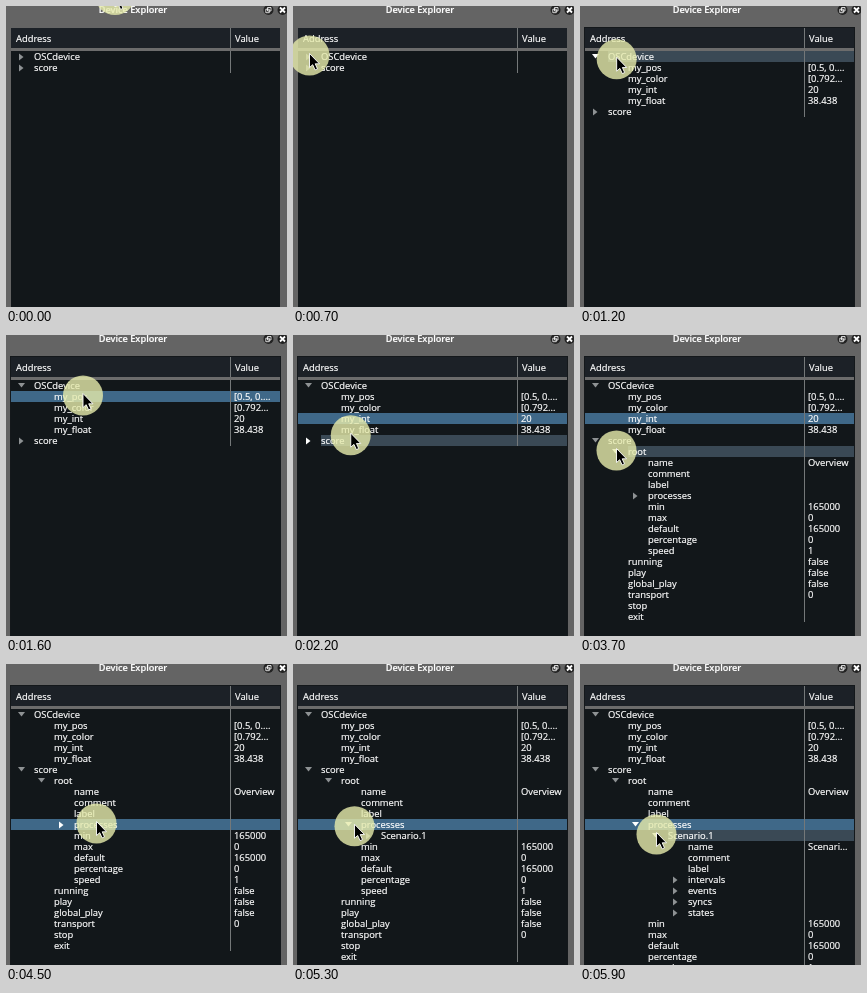
These frames come from a looping animation (281x301 px, 6700 ms). An HTML page:

```html
<!DOCTYPE html>
<html lang="en">
<head>
<meta charset="utf-8">
<title>Device Explorer</title>
<style>
  html, body { margin: 0; width: 100%; height: 100%; overflow: hidden; background: #646464; }
  body { position: relative; font: 9.4px/11px "Open Sans", "Noto Sans", sans-serif; color: #fff; -webkit-text-stroke: .2px #fff; }
  .title { position: absolute; left: 0; top: -2px; width: 254px; text-align: center; font-size: 9.2px; font-weight: 600; }
  svg { position: absolute; left: 0; top: 0; overflow: visible; }
  .panel { position: absolute; left: 5px; top: 22px; width: 269px; height: 279px; background: #12171a; overflow: hidden; }
  .panel.focused { box-shadow: 0 0 0 1px #14181b; }
  .head { position: relative; height: 20px; line-height: 21px; background: #1c2127; border-bottom: 3px solid #6c6c6c; }
  .row { position: relative; height: 11px; white-space: pre; }
  .row.hover { background: linear-gradient(#3a4955, #3a4955) var(--indent) 0 no-repeat; }
  .row.picked { background: #3f6888; }
  .head span, .row span { position: absolute; top: 0; }
  .row .label { left: var(--indent); }
  .row .value { left: 223px; }
  .head::after, .row::after { content: ""; position: absolute; left: 219px; top: 0; width: 1px; height: 100%; background: #747879; }
  .arrow { position: absolute; left: calc(var(--indent) - 16.5px); top: 2px; width: 8px; height: 8px;
           background: #8e9294; clip-path: polygon(1.5px .5px, 6px 4px, 1.5px 7.5px); }
  .arrow.open { clip-path: polygon(.5px 1px, 7.5px 1px, 4px 5.5px); }
  .hover .arrow, .picked .arrow { background: #fff; }
</style>
</head>
<body>
<div class="title">Device Explorer</div>
<svg width="281" height="12">
  <g fill="#222" stroke="#fff">
    <circle cx="262.5" cy="4" r="5" stroke="none"/>
    <path d="M261.5 1.5h3.5v3.5h-3.5zM259.8 3.2h3.5v3.5h-3.5z" stroke-width=".8"/>
    <circle cx="276.5" cy="4" r="5" stroke="none"/>
    <path d="M274 1.5l5 5m0-5l-5 5" stroke-width="1.8"/>
  </g>
</svg>
<div class="panel">
  <div class="head"><span style="left:5px">Address</span><span style="left:224px">Value</span></div>
  <div id="tree"></div>
</div>
<svg width="281" height="301">
  <g id="pointer">
    <circle cy="1" r="20" fill="#e6ecac" fill-opacity=".8"/>
    <path d="M0 -1V13L3.2 10.2L5.6 15.4L8 14.4L5.7 9.3H10Z" fill="#000" stroke="#fff" stroke-width=".9"/>
  </g>
</svg>
<script>
const LOOP = 6700, STEP = 100, FOCUS_AT = 900;
const ROW_HEIGHT = 11, TREE_TOP = 45, INDENT = 20;

// One tab per level; "+" marks a branch, "=" precedes a value.
const OUTLINE = `
+OSCdevice
	my_pos=[0.5, 0....
	my_color=[0.792...
	my_int=20
	my_float=38.438
+score
	+root
		name=Overview
		comment
		label
		+processes
			+Scenario.1
				name=Scenari...
				comment
				label
				+intervals
				+events
				+syncs
				+states
		min=165000
		max=0
		default=165000
		percentage=0
		speed=1
	running=false
	play=false
	global_play=false
	transport=0
	stop
	exit`;

// Each move ends in a click: on the arrow it opens a branch,
// at a distance from the label's start it selects the row.
const MOVES = [
  { from: 0, to: 400, row: "OSCdevice", click: 900, power: 2 },
  { from: 1000, to: 1600, row: "my_pos", click: 1600, onLabel: 29 },
  { from: 1700, to: 2100, row: "my_int", click: 2100, onLabel: 18 },
  { from: 2100, to: 2700, row: "score", click: 2700, sag: 28 },
  { from: 3000, to: 3400, row: "root", click: 3500 },
  { from: 3700, to: 4500, row: "processes", click: 4500, onLabel: 22.5, power: 5 },
  { from: 4500, to: 4800, row: "processes", click: 4900 },
  { from: 5200, to: 5600, row: "Scenario.1", click: 5700 }
];

function add(parent, tag, className, text = "") {
  const el = document.createElement(tag);
  el.className = className;
  el.textContent = text;
  return parent.appendChild(el);
}

const panel = document.querySelector(".panel");
const tree = document.getElementById("tree");
const pointer = document.getElementById("pointer");

const parents = [];
const rows = OUTLINE.trim().split("\n").map(line => {
  const [, tabs, branch, label, value] = line.match(/^(\t*)(\+?)([^=]*)=?(.*)$/);
  const depth = tabs.length;
  const el = add(tree, "div", "row");
  el.style.setProperty("--indent", 23 + INDENT * depth + "px");
  const arrow = branch && add(el, "i", "arrow");
  add(el, "span", "label", label);
  add(el, "span", "value", value);
  const opening = MOVES.find(move => move.row === label && !move.onLabel);
  return parents[depth] = { el, arrow, label, depth, parent: parents[depth - 1], opens: opening ? opening.click : Infinity };
});

const isShown = ({ parent }, t) => !parent || (t >= parent.opens && isShown(parent, t));
const shownRows = t => rows.filter(row => isShown(row, t));

const START = { x: 109, y: -12 };
MOVES.forEach((move, i) => {
  const shown = shownRows(move.click);
  const index = shown.findIndex(row => row.label === move.row);
  move.start = i ? MOVES[i - 1].end : START;
  move.end = {
    x: 16.5 + INDENT * shown[index].depth + (move.onLabel ? 11.5 + move.onLabel : 0),
    y: TREE_TOP + 3.5 + ROW_HEIGHT * index
  };
});

function pointerAt(t) {
  const { from, to, start, end, power = 1, sag = 0 } = MOVES.filter(move => move.from <= t).pop();
  const progress = Math.min(1, (t - from) / (to - from));
  const k = progress ** power;
  return {
    x: start.x + (end.x - start.x) * k,
    y: start.y + (end.y - start.y) * k + sag * Math.sin(Math.PI * progress)
  };
}

function render(t) {
  const { x, y } = pointerAt(t);
  pointer.setAttribute("transform", `translate(${x} ${y})`);
  const focused = t >= FOCUS_AT;
  panel.classList.toggle("focused", focused);
  const pick = MOVES.filter(move => move.onLabel && move.click <= t).pop();
  const shown = shownRows(t);
  const hovered = focused && shown[Math.floor((y + 1 - TREE_TOP) / ROW_HEIGHT)];
  for (const row of rows) {
    row.el.style.display = shown.includes(row) ? "" : "none";
    row.el.classList.toggle("hover", row === hovered);
    row.el.classList.toggle("picked", !!pick && pick.row === row.label);
    if (row.arrow) row.arrow.classList.toggle("open", t >= row.opens);
  }
}

const startTime = performance.now();
function tick(now) {
  const t = Math.max(0, now - startTime) % LOOP;
  render(Math.floor(t / STEP) * STEP);
  requestAnimationFrame(tick);
}
render(0);
requestAnimationFrame(tick);
</script>
</body>
</html>
```
